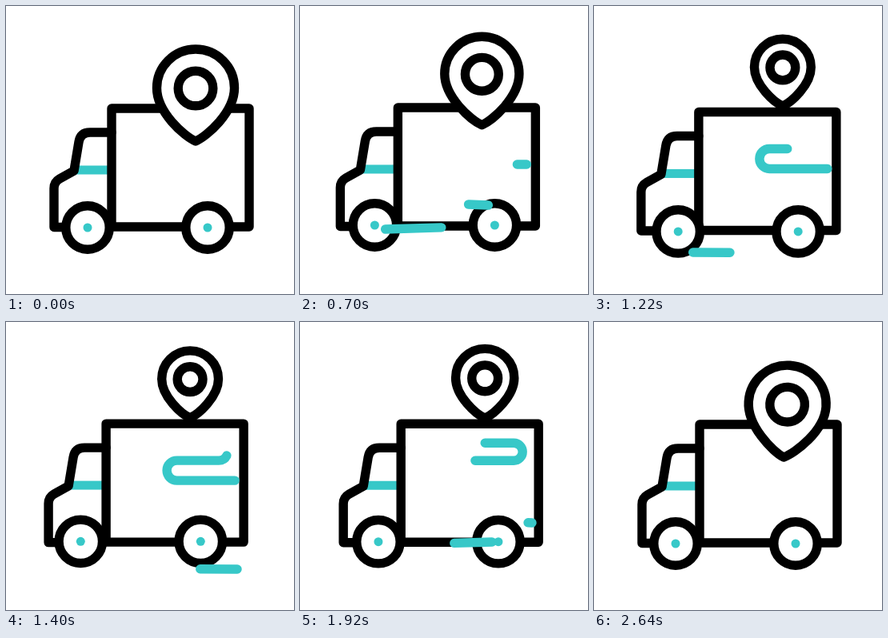
Write an HTML page with a canvas that moves like this. It is 360 by 360 pixels and loops after 2.66 s.

```html
<!DOCTYPE html>
<html lang="en">
<head>
<meta charset="utf-8">
<title>Delivery truck</title>
<style>
  html, body { margin: 0; width: 100%; height: 100%; overflow: hidden; background: #fff; }
  canvas { display: block; width: 360px; height: 360px; }
</style>
</head>
<body>
<canvas id="stage" width="360" height="360"></canvas>
<script>
const ctx = document.getElementById('stage').getContext('2d');
const LOOP = 2660, DRIVE_START = 50, DRIVE_END = 2220, CYCLE = 1085;
const BLACK = '#000', TEAL = '#37c8c8', WEIGHT = 11.4;
const TAU = Math.PI * 2;

const pinShape = new Path2D('M0 0C-14-6-48.5-36-48.5-66.5A48.5 48.5 0 0 1 48.5-66.5C48.5-36 14-6 0 0Z');
const cabShape = new Path2D('M132 158H105Q93 158 91 170L85 206L67 216Q60 220 60 228V276.5H76');
const boxShape = new Path2D('M132 128H304V276H132Z');
const route = new Path2D('M293 199H220.5A12.5 12.5 0 0 1 220.5 174H273A11 11 0 0 0 273 152H237');
const ROUTE_LENGTH = 235;

const progress = (t, from, to) => Math.min(1, Math.max(0, (t - from) / (to - from)));

function ease(t, from, to) {
  const u = progress(t, from, to);
  return u * u * (3 - 2 * u);
}

// The truck rolls forward and back, with a short dip as it sets off
function truckPose(phase) {
  const u = phase / CYCLE;
  const roll = (1 - Math.cos(TAU * u ** 0.9)) / 2;
  const rise = Math.min(1, 1.5 * roll);
  const dip = Math.sin(Math.PI * progress(phase, 0, 190)) ** 2;
  const x = -11.5 * roll;
  return {
    x,
    y: 4.7 * dip - rise,
    wheelX: x + 5.3 * dip - 1.8 * Math.sin(TAU * u),
    wheelY: 5.5 * dip - 3 * rise
  };
}

// The pin hops onto the roof, shrinks, then drops back with a sway
function pinPose(t) {
  return {
    lift: 18.5 * ease(t, 400, 660) + 29.8 * ease(t, 660, 1080) - 48.3 * ease(t, 1900, 2500),
    scale: 1 - 0.27 * (ease(t, 580, 1080) - ease(t, 1820, 2360)),
    tilt: 5.5 * ease(t, 2220, 2640) - 1.5 * ease(t, 2080, 2220)
  };
}

function stroke(path, color = BLACK, fill) {
  if (fill) {
    ctx.fillStyle = fill;
    ctx.fill(path);
  }
  ctx.strokeStyle = color;
  ctx.stroke(path);
}

function circle(x, y, r) {
  const path = new Path2D();
  path.arc(x, y, r, 0, TAU);
  return path;
}

// A stroke whose head sets off first and whose tail follows after a delay
function streak(t, [x0, y0, x1, y1], start, duration, delay) {
  const head = progress(t, start, start + duration);
  const tail = progress(t, start + delay, start + delay + duration);
  if (head <= tail) return;
  const path = new Path2D();
  path.moveTo(x0 + (x1 - x0) * tail, y0 + (y1 - y0) * tail);
  path.lineTo(x0 + (x1 - x0) * head, y0 + (y1 - y0) * head);
  stroke(path, TEAL);
}

function drawRoute(t) {
  const head = ROUTE_LENGTH * progress(t, 650, 1652);
  const tail = ROUTE_LENGTH * progress(t, 1660, 2190);
  if (head <= tail) return;
  ctx.setLineDash([head - tail, 1000]);
  ctx.lineDashOffset = -tail;
  stroke(route, TEAL);
  ctx.setLineDash([]);
}

function drawPin(t) {
  const { lift, scale, tilt } = pinPose(t);
  ctx.save();
  ctx.translate(237, 169 - lift);
  ctx.rotate(tilt * Math.PI / 180);
  // Scale the shape but keep the line weight
  const shape = new Path2D();
  shape.addPath(pinShape, new DOMMatrix().scale(scale));
  stroke(shape, BLACK, '#fff');
  stroke(circle(0, -66 * scale, 21.8 * scale));
  ctx.restore();
}

function drawBody(t) {
  ctx.fillStyle = TEAL;
  ctx.fillRect(86, 199.5, 44, 11);
  stroke(cabShape);
  stroke(boxShape);
  drawRoute(t);
  drawPin(t);
}

function drawWheel(x, y) {
  stroke(circle(x, y, 27.2), BLACK, '#fff');
  ctx.fillStyle = TEAL;
  ctx.fill(circle(x, y, 5.5));
}

function draw(t) {
  const driving = t > DRIVE_START && t < DRIVE_END;
  const phase = driving ? (t - DRIVE_START) % CYCLE : 0;
  const pose = truckPose(phase);

  ctx.fillStyle = '#fff';
  ctx.fillRect(0, 0, 360, 360);
  ctx.lineWidth = WEIGHT;
  ctx.lineJoin = ctx.lineCap = 'round';

  ctx.save();
  ctx.translate(pose.x, pose.y);
  drawBody(t);
  ctx.restore();

  for (const x of [102, 252]) drawWheel(x + pose.wheelX, 277 + pose.wheelY);

  // Road and wind streaks
  streak(phase, [123, 308, 295, 309], 15, 260, 70);
  streak(phase, [106, 279, 240, 275], 540, 210, 110);
  streak(phase, [210, 248, 290, 251], 605, 145, 45);

  // Headlight rays
  streak(t, [44, 247, 21.5, 246], 2130, 160, 80);
  streak(t, [48, 223, 30, 205], 2190, 140, 25);
  streak(t, [42.5, 270.5, 27, 284], 2190, 140, 25);
}

function tick() {
  draw(performance.now() % LOOP);
  requestAnimationFrame(tick);
}
tick();
</script>
</body>
</html>
```
